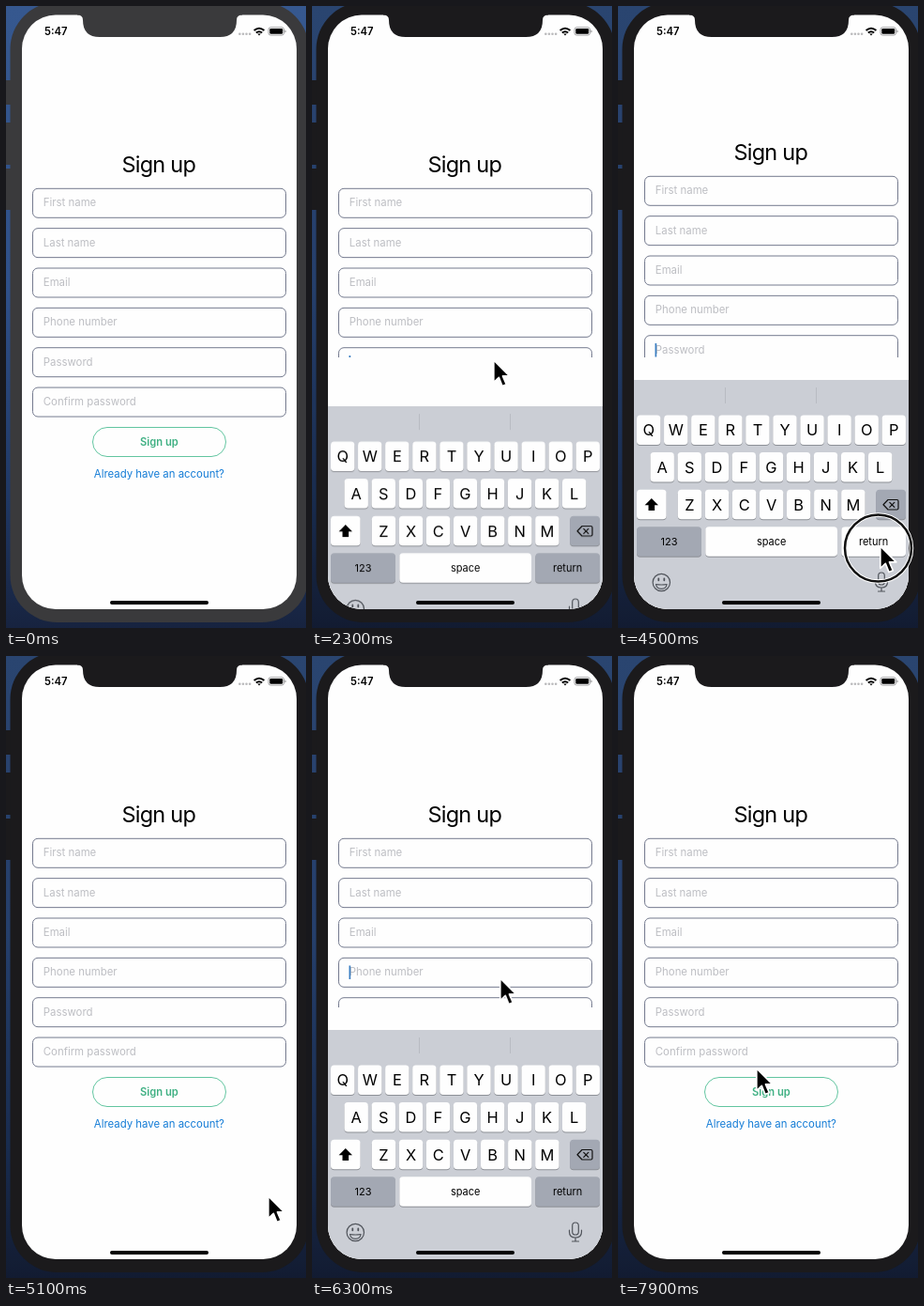
An HTML page that plays this animation: 320x662 px, repeating every 8 s.

```html
<!DOCTYPE html>
<html lang="en">
<head>
<meta charset="utf-8">
<title>Sign up form</title>
<style>
  html, body { margin: 0; width: 100%; height: 100%; overflow: hidden; background: #2c4878; }
  svg { display: block; width: 100%; height: 100%; }
  text { font-family: Inter, Roboto, sans-serif; font-size: 11.4px; }
  .mid { text-anchor: middle; }
  .title { font-size: 23.5px; letter-spacing: -.75px; }
  .field { fill: #fefefe; stroke: #747a8e; }
  .hint { fill: #bdbec3; }
  .bold { font-weight: 600; }
  .letter { font-size: 16.4px; }
  .small { font-size: 11px; }
  .icon { fill: none; stroke: #50545b; stroke-width: 1.2; stroke-linecap: round; stroke-linejoin: round; }

  .shell, .shade, .form, .cover, .caret, .keys, .pressed, .mouse, .arrow, .ring {
    animation: 8s step-end infinite;
  }

  .shell { animation-name: shell; }
  @keyframes shell { 0% { fill: #3a3a3c } 25%, 100% { fill: #1b1a1c } }
  .shade { animation-name: shade; }
  @keyframes shade { 0% { opacity: 0 } 25%, 100% { opacity: .22 } }

  .form { animation-name: form; animation-timing-function: ease-out; }
  @keyframes form {
    0%, 34.4% { transform: translateY(0) }
    36.25%, 57.5% { transform: translateY(-13px) }
    61.25%, 100% { transform: translateY(0) }
  }

  .cover { animation-name: cover; }
  @keyframes cover {
    0%, 57.5%, 91.9%, 100% { opacity: 0 }
    26.5%, 73.15% { opacity: 1 }
  }

  .password { animation-name: blink-password; }
  @keyframes blink-password {
    0%, 41.25%, 50%, 57.5%, 100% { opacity: 0 }
    26.5%, 46.25%, 53.75% { opacity: 1 }
  }
  .phone { animation-name: blink-phone; }
  @keyframes blink-phone {
    0%, 81.25%, 91.9%, 100% { opacity: 0 }
    73.15%, 85.6% { opacity: 1 }
  }

  .keys { animation-name: keys; animation-timing-function: cubic-bezier(.215, .61, .355, 1); }
  @keyframes keys {
    0%, 26.5%, 61.875%, 73.15%, 96.25%, 100% { transform: translateY(644px) }
    30.875%, 57.5%, 77.525%, 91.9% { transform: translateY(398px) }
  }

  .pressed { animation-name: pressed; }
  @keyframes pressed {
    0%, 57.5%, 91.9%, 100% { opacity: 0 }
    53.75%, 89.4% { opacity: 1 }
  }

  .mouse { animation-name: mouse; animation-timing-function: ease-in-out; }
  @keyframes mouse {
    0%, 16.25% { transform: translate(325px, 470px) }
    21.9%, 31.5% { transform: translate(193px, 376px) }
    36.25%, 66.25% { transform: translate(279px, 574px) }
    70.6%, 78.1% { transform: translate(199px, 340px) }
    87.5%, 93.1% { transform: translate(294px, 555px) }
    98.7%, 100% { transform: translate(147px, 438px) }
  }
  .arrow { animation-name: arrow; }
  @keyframes arrow { 0% { opacity: 0 } 16.25%, 100% { opacity: 1 } }
  .ring { animation-name: ring; }
  @keyframes ring {
    0%, 26.5%, 57.5%, 73.15%, 91.9%, 100% { opacity: 0 }
    23.75%, 53.75%, 70.6%, 89.4% { opacity: 1 }
  }
</style>
</head>
<body>
<svg viewBox="0 0 320 662" preserveAspectRatio="none">
  <defs>
    <linearGradient id="sea" x2="0" y2="1">
      <stop offset="0" stop-color="#36588f"/>
      <stop offset=".45" stop-color="#2f5089"/>
      <stop offset=".8" stop-color="#1f3763"/>
      <stop offset="1" stop-color="#17233f"/>
    </linearGradient>
    <clipPath id="screen"><rect x="17" y="9.5" width="293" height="632.5" rx="36"/></clipPath>
  </defs>

  <rect width="320" height="662" fill="url(#sea)"/>
  <rect class="shade" width="320" height="662"/>

  <g class="shell">
    <path d="M0 79h5v26H0zM0 124h5v45H0zM0 173h5v44H0z"/>
    <rect x="4.5" y="-4" width="318.5" height="660" rx="50"/>
  </g>

  <g clip-path="url(#screen)">
    <rect x="17" y="9" width="293" height="634" fill="#fefefe"/>

    <g class="form">
      <text class="mid title" x="162.8" y="177">Sign up</text>
      <g id="fields"></g>
      <rect x="92.5" y="448.5" width="142" height="31" rx="15.5" fill="none" stroke="#62c5a0"/>
      <text class="mid bold" x="163.4" y="468" fill="#3fb083" style="font-size:11.2px">Sign up</text>
      <text class="mid" x="163.4" y="502" fill="#147cd6">Already have an account?</text>
      <g fill="#3b7fc2">
        <rect class="caret password" x="39.5" y="372" width="1.7" height="14.5"/>
        <rect class="caret phone" x="39.5" y="329.5" width="1.7" height="14.5"/>
      </g>
    </g>

    <rect class="cover" x="17" y="374" width="293" height="268" fill="#fefefe"/>

    <g class="keys">
      <rect x="17" width="293" height="250" fill="#cbced5"/>
      <path d="M114.5 8v17M211.5 8v17" stroke="#b8bbc2"/>
      <g id="caps"></g>
      <path d="M35.8 126l7.2 7.3h-3.9v5.7h-6.6v-5.7h-3.9z"/>
      <g class="icon">
        <path d="M288 127.5h9.5q1.5 0 1.5 1.500v7.500q0 1.500-1.500 1.500h-9.500l-5-5.250zM289.800 130.300l5 5m0-5l-5 5" stroke="#111"/>
        <circle cx="46.300" cy="215.500" r="9.200"/>
        <path d="M40.500 217.500q5.800 1 11.600 0q-.8 4.800-5.800 4.800t-5.800-4.800z"/>
        <path d="M43.300 211.500v1.800M49.300 211.500v1.800" stroke-width="1.800"/>
        <rect x="277.700" y="205" width="6.600" height="13" rx="3.300"/>
        <path d="M274.500 213v2q0 6 6.500 6t6.500-6v-2M281 221v4M277.500 225h7"/>
      </g>
    </g>

    <rect x="111" y="633" width="105" height="4" rx="2"/>
  </g>

  <path class="shell" d="M76 8V9.500Q82 9.500 82 15Q82 33 100 33H228Q246 33 246 15Q246 9.500 252 9.500V8z"/>

  <text class="bold" x="41" y="31" style="font-size:11.3px">5:47</text>
  <path d="M249.300 29.800h12" stroke="#b9b9bb" stroke-width="2.600" stroke-linecap="round" stroke-dasharray="0 3.600"/>
  <g fill="none" stroke="#000" stroke-width="2">
    <path d="M264.600 26.100q5.400-4.800 10.800 0M266.800 28.600q3.200-2.700 6.400 0"/>
    <path d="M268.200 29.600h3.600l-1.800 1.900z" fill="#000" stroke="none"/>
  </g>
  <rect x="280" y="22.700" width="16.500" height="8.400" rx="2.400" fill="none" stroke="#8b8b8d" stroke-width=".8"/>
  <rect x="281.300" y="24" width="13.900" height="5.800" rx="1.300"/>
  <path d="M297.500 25.400q1.200.4 1.200 1.500t-1.200 1.500z" fill="#8b8b8d"/>

  <g class="mouse">
    <g class="ring" fill="none">
      <circle cx="-1.500" cy="3" r="35.500" stroke="#fff" stroke-width="4.500"/>
      <circle cx="-1.500" cy="3" r="35.500" stroke="#111" stroke-width="2.500"/>
    </g>
    <path class="arrow" d="M.8 .8V24.500L6.300 19.400L10 28.500L14.300 26.700L10.500 17.800H17.800z" fill="#000" stroke="#fff" stroke-width="1.700" stroke-linejoin="round"/>
  </g>
</svg>

<script>
  const make = (parent, tag, attrs, label) => {
    const el = document.createElementNS('http://www.w3.org/2000/svg', tag);
    for (const name in attrs) el.setAttribute(name, attrs[name]);
    if (label) el.textContent = label;
    parent.append(el);
  };

  const fields = document.getElementById('fields');
  ['First name', 'Last name', 'Email', 'Phone number', 'Password', 'Confirm password'].forEach((label, i) => {
    const y = 194.3 + i * 42.35;
    make(fields, 'rect', { class: 'field', x: 28.5, y, width: 270, height: 31, rx: 5.5 });
    make(fields, 'text', { class: 'hint', x: 39.8, y: y + 19 }, label);
  });

  const caps = document.getElementById('caps');
  const white = '#fefefe', gray = '#a3a8b3';
  const cap = (x, y, width, fill, extra) => {
    const box = { x, width, height: 31.5, rx: 3.8 };
    make(caps, 'rect', { ...box, y: y + 1, fill: '#8d9096' });
    make(caps, 'rect', { ...box, y, fill });
    if (extra) make(caps, 'rect', { ...box, y, fill: white, class: extra });
  };
  const word = (x, label) => make(caps, 'text', { class: 'mid small', x, y: 175.8 }, label);

  [['QWERTYUIOP', 32.7, 37.6], ['ASDFGHJKL', 47.2, 77.1], ['ZXCVBNM', 76.5, 116.7]].forEach(([row, start, y]) => {
    [...row].forEach((letter, i) => {
      const x = start + i * 29.06;
      cap(x - 12.7, y, 25.4, white);
      make(caps, 'text', { class: 'mid letter', x, y: y + 21.8 }, letter);
    });
  });
  cap(20, 116.7, 31.6, white);
  cap(275.2, 116.7, 31.8, gray);
  cap(20, 156.2, 69, gray);
  cap(93.3, 156.2, 140.7, white);
  cap(238.3, 156.2, 68.7, gray, 'pressed');
  word(54.5, '123');
  word(163.7, 'space');
  word(272.6, 'return');
</script>
</body>
</html>
```
